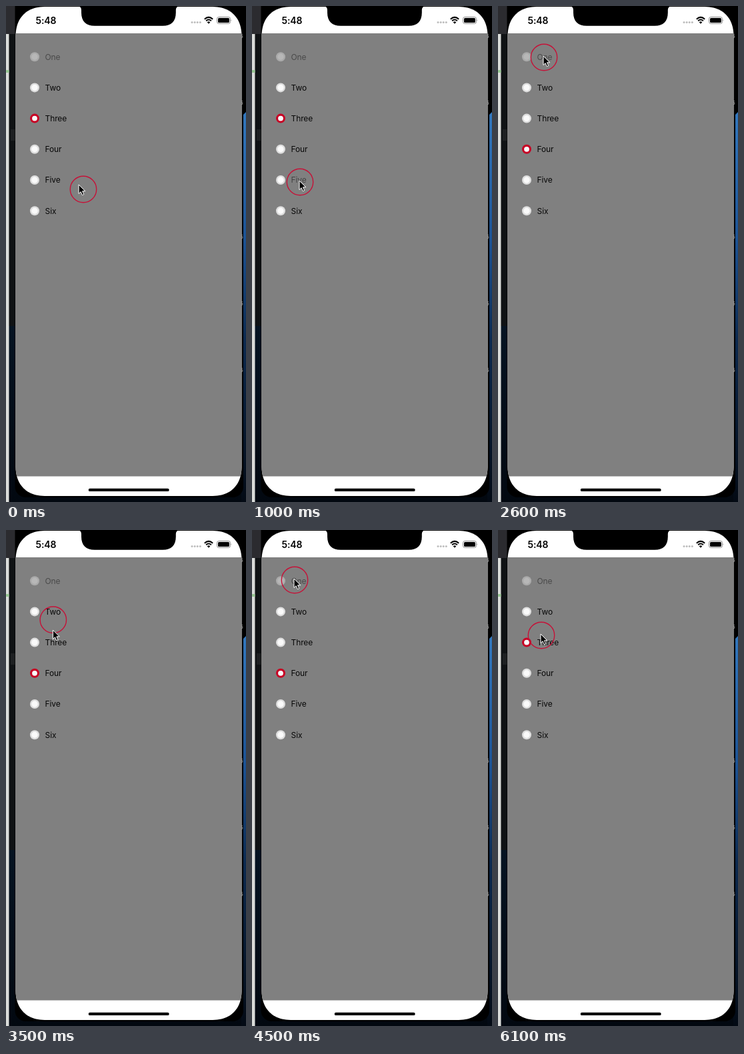
Write an HTML page that moves like this. It is 360 px wide and 744 px high and loops after 6.4 s.

```html
<!DOCTYPE html>
<html lang="en">
<head>
<meta charset="utf-8">
<title>Radio list</title>
<style>
  html, body { margin: 0; width: 100%; height: 100%; overflow: hidden; background: #000; }
  svg { display: block; width: 100vw; height: 100vh; }
  text { font-family: Inter, Roboto, sans-serif; }
  .label { font-size: 12px; letter-spacing: -.15px; fill: #080808; }
</style>
</head>
<body>
<svg viewBox="0 0 360 744" preserveAspectRatio="none">
  <defs>
    <linearGradient id="sky" x1="0" y1="0" x2="0" y2="1">
      <stop offset="0" stop-color="#3277bd"/>
      <stop offset=".33" stop-color="#1c5293"/>
      <stop offset=".58" stop-color="#0c2a50"/>
      <stop offset="1" stop-color="#030a14"/>
    </linearGradient>
    <linearGradient id="dusk" x1="0" y1="0" x2="0" y2="1">
      <stop offset="0" stop-color="#051322"/>
      <stop offset="1" stop-color="#020810"/>
    </linearGradient>
    <clipPath id="screen"><path id="outline"/></clipPath>
  </defs>

  <!-- desktop behind the phone -->
  <rect width="360" height="744" fill="#000"/>
  <rect y="480" width="360" height="264" fill="url(#dusk)"/>
  <rect width="14" height="42" fill="#2b2b2f"/>
  <rect y="42" width="4.500" height="702" fill="#dadcda"/>
  <rect y="96" width="4.500" height="4" fill="#98c894"/>
  <rect x="5" y="42" width="10" height="438" fill="#0f1214"/>
  <rect x="7" y="185" width="8" height="17" fill="#1e2022"/>
  <path d="M353 166L360 159V744H353Z" fill="url(#sky)"/>
  <rect x="13.500" y="-30" width="342.500" height="767" rx="16" fill="#000"/>
  <g id="marks" font-size="8" fill="#a4a4a4"></g>

  <!-- phone screen -->
  <g clip-path="url(#screen)">
    <rect width="360" height="744" fill="#fff"/>
    <rect y="41" width="360" height="664.500" fill="#808080"/>
  </g>
  <path d="M108 0C112 1 113 3 113 7V10C113 23 120 29.700 133 29.700H235C248 29.700 254.800 23 254.800 10V7C254.800 3 256 1 260 0Z"/>
  <text x="44.500" y="26.500" font-size="14" font-weight="600" letter-spacing="-.1">5:48</text>
  <g id="dots" fill="#bdbdbd"></g>
  <path d="M297.800 19.700Q304 14 310.200 19.700M300.100 22.300Q304 18.800 307.900 22.300" fill="none" stroke="#000" stroke-width="2"/>
  <path d="M301.700 24.200Q304 22.400 306.300 24.200L304 26.700Z"/>
  <rect x="316.500" y="16.500" width="20" height="10" rx="2.800" fill="none" stroke="#8d8d8d"/>
  <rect x="318" y="18" width="17" height="7" rx="1.600"/>
  <path d="M337.600 19.700Q339.200 21.500 337.600 23.300Z" fill="#8d8d8d"/>
  <rect x="123.700" y="723.700" width="121" height="4.400" rx="2.200"/>

  <g id="list"></g>
  <circle id="halo" r="19.700" fill="none" stroke="#c51238" stroke-width="1.400"/>
  <path id="arrow" d="M0 0V13.600L3.100 10.700L5.300 15.700L7.700 14.700L5.500 9.800H9.800Z" fill="#000" stroke="#fff" stroke-width="1" stroke-linejoin="round"/>
</svg>
<script>
const LOOP = 6400, STEP = 100, LEAD = 70;
const NAMES = ["One", "Two", "Three", "Four", "Five", "Six"];
const $ = id => document.getElementById(id);

function add(parent, tag, attrs, text = "") {
  const el = document.createElementNS("http://www.w3.org/2000/svg", tag);
  for (const key in attrs) el.setAttribute(key, attrs[key]);
  el.textContent = text;
  return parent.appendChild(el);
}

// superellipse corners of radius r, joined by straight sides
function roundedOutline(left, top, right, bottom, r) {
  const points = [];
  for (let i = 0; i < 100; i++) {
    const a = 2 * Math.PI * (i + 0.5) / 100;
    const c = Math.cos(a), s = Math.sin(a);
    const bend = v => Math.sign(v) * Math.abs(v) ** 0.85;
    const x = (c > 0 ? right - r : left + r) + r * bend(c);
    const y = (s > 0 ? bottom - r : top + r) + r * bend(s);
    points.push(`${x.toFixed(2)} ${y.toFixed(2)}`);
  }
  return `M${points.join("L")}Z`;
}
$("outline").setAttribute("d", roundedOutline(14.5, 1, 353.5, 735, 46));

for (const y of [48, 148, 349, 449, 549]) add($("marks"), "text", { x: 351, y }, "5");
for (let i = 0; i < 4; i++) add($("dots"), "circle", { cx: 279 + 4.1 * i, cy: 24.5, r: 1.5 });

const rows = NAMES.map((name, i) => {
  const cy = 76.2 + 46.2 * i;
  const row = add($("list"), "g", { opacity: i ? 1 : 0.45 });
  return {
    ring: add(row, "circle", { cx: 43, cy, r: 7 }),
    hole: add(row, "circle", { cx: 43, cy, r: 4.5, fill: "#fafafa" }),
    label: add(row, "text", { class: "label", x: 58.6, y: cy + 4.3 }, name)
  };
});

// pointer moves, each eased from where the last one stopped
const HOME = [116, 275];
const MOVES = [
  { from: 0, to: 200, end: [95, 257] },
  { from: 200, to: 700, end: [72, 264] },
  { from: 1300, to: 1600, end: [63, 216] },
  { from: 2200, to: 2600, end: [69, 77] },
  { from: 3200, to: 3720, end: [72, 171] },
  { from: 3900, to: 4400, end: [64, 75] },
  { from: 4800, to: 5400, end: [69, 163] },
  { from: 5800, to: 6100, end: [65, 158] }
];
const TAPS = [
  { down: 900, up: 1100, row: 4 },
  { down: 1800, up: 1900, row: 3 },
  { down: 5700, up: 5800, row: 2 }
];

const clamp = v => Math.min(1, Math.max(0, v));
const ease = k => k * k * (3 - 2 * k);

function pointer(t) {
  let [x, y] = HOME;
  for (const { from, to, end } of MOVES) {
    const k = ease(clamp((t - from) / (to - from)));
    x += (end[0] - x) * k;
    y += (end[1] - y) * k;
  }
  return [x, y];
}

function draw(now) {
  const t = Math.floor((now % LOOP) / STEP) * STEP;
  let chosen = 2, pressed = -1;
  for (const { down, up, row } of TAPS) {
    if (t >= up) chosen = row;
    else if (t >= down) pressed = row;
  }
  rows.forEach(({ ring, hole, label }, i) => {
    ring.setAttribute("fill", i === chosen ? "#c70024" : "#dedede");
    hole.setAttribute("r", i === chosen ? 3.9 : 4.7);
    label.setAttribute("opacity", i === pressed ? 0.5 : 1);
  });
  const [x, y] = pointer(t), [ax, ay] = pointer(t + LEAD);
  $("halo").setAttribute("transform", `translate(${x} ${y})`);
  $("arrow").setAttribute("transform", `translate(${ax - 1} ${ay - 2})`);
}

const start = performance.now();
function tick() {
  draw(performance.now() - start);
  requestAnimationFrame(tick);
}
tick();
</script>
</body>
</html>
```
